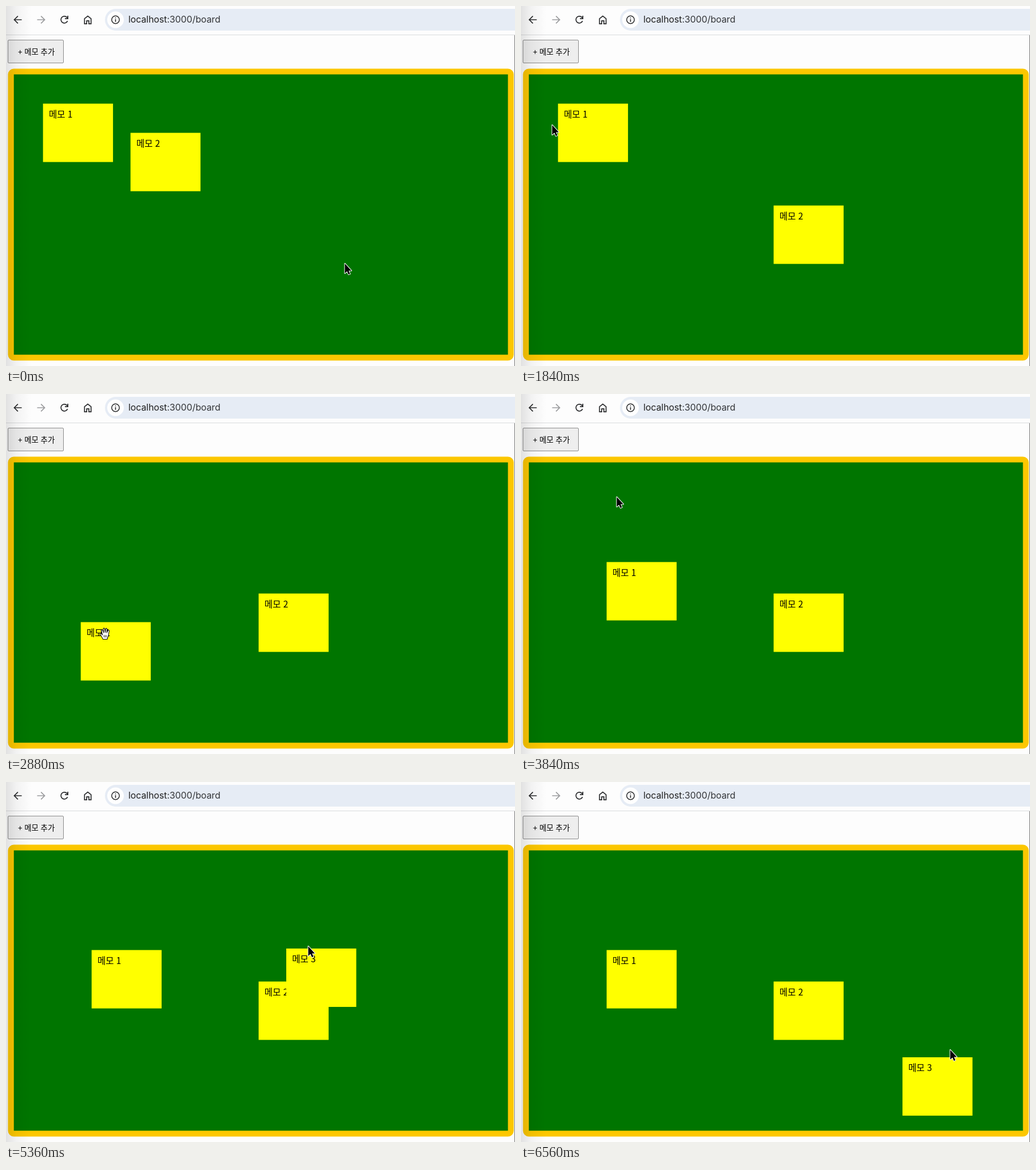
These frames come from a looping animation (890x629 px, 6.64 s). An HTML page:

```html
<!DOCTYPE html>
<html lang="ko">
<head>
<meta charset="utf-8">
<title>Memo board</title>
<style>
  html, body { margin: 0; width: 100%; height: 100%; overflow: hidden; background: #fdfdfd; }
  #stage { position: relative; width: 890px; height: 629px; overflow: hidden; color: #000;
    font-family: "Noto Sans CJK KR", "Noto Sans CJK", "Noto Sans CJK JP", sans-serif; }
  #stage > *, .memo { position: absolute; }
  #bar { left: 0; top: 0; }
  #url { left: 214px; top: 12px; font: 15.8px/24px Inter, Roboto, sans-serif; color: #333538; white-space: pre; }
  #url b { font-weight: 400; color: #1f1f1f; }
  #add { left: 3px; top: 58.5px; width: 97.5px; height: 41px; box-sizing: border-box; padding: 10px 0 0 17px;
    border: 1px solid #8c8c8c; border-radius: 2px; background: #eee; font-size: 13.4px; line-height: 18px;
    font-weight: 500; white-space: pre; }
  /* The page is zoomed by 2 percent */
  #board { left: 0; top: 0; width: 847px; height: 480px; border: 10px solid #fcc700; border-radius: 10px;
    background: #007500; transform-origin: 0 0; transform: translate(3.5px, 109.4px) scale(1.02); }
  .memo { left: 0; top: 0; width: 120px; height: 100px; box-sizing: border-box; padding: 8px 0 0 10px;
    background: #ff0; font-size: 15.2px; line-height: 18px; white-space: pre; }
  #lift { opacity: .9; box-shadow: 0 4px 16px rgba(0, 0, 0, .4); }
  #shade { left: 0; top: 0; width: 44px; height: 629px;
    background: linear-gradient(90deg, rgba(0,0,0,.11), rgba(0,0,0,.045) 40%, transparent); }
  #edge { left: 889px; top: 51px; width: 1px; height: 578px; background: #777; }
  #cursor { left: 0; top: 0; overflow: visible; }
</style>
</head>
<body>
<div id="stage">
  <svg id="bar" width="890" height="52" fill="none" stroke-width="1.7">
    <rect y="50" width="890" height="1" fill="#dadbdd"/>
    <rect x="173" y="5" width="760" height="38" rx="19" fill="#e6ecf5"/>
    <circle cx="191.5" cy="24" r="14.5" fill="#fff"/>
    <g stroke="#2b2c2e">
      <path d="M27.5 24H15M20.8 17.6 14.4 24l6.4 6.4"/>
      <path d="M54.5 24H67M61.2 17.6 67.6 24l-6.4 6.4" stroke="#9b9c9e"/>
      <path d="M107.6 26.2A6 6 0 1 1 106.4 19.6L108 21.4"/>
      <path d="M108.1 17v5.1H103"/>
      <path d="M137.3 22.1 143 17.6l5.7 4.5v9h-3.8v-5.3h-3.8v5.3h-3.8z"/>
      <circle cx="191.5" cy="24" r="6.7" stroke-width="1.5"/>
      <path d="M191.5 23v4.8M191.5 19.9v1.7" stroke-width="1.6"/>
    </g>
  </svg>
  <div id="url"><b>localhost</b>:3000/board</div>
  <div id="add">+ 메모 추가</div>
  <div id="board">
    <div class="memo">메모 1</div>
    <div class="memo">메모 2</div>
    <div class="memo">메모 3</div>
    <div class="memo" id="lift"></div>
  </div>
  <div id="shade"></div>
  <div id="edge"></div>
  <svg id="cursor" width="1" height="1" stroke-linejoin="round" stroke-linecap="round">
    <path id="arrow" d="M.5 1V18L4.4 14.4 7 20.2 9.6 19.1 7.1 13.4H12Z"
      fill="#000" stroke="#fff" stroke-width="2" paint-order="stroke"/>
    <g id="hand" stroke="#000" stroke-width="1.1" fill="#fff">
      <path d="M-3.6 10.5C-4 8-6.5 5.5-8 2.6-9 .6-6.8-.2-5.6 1.4L-4.4 3-6.3-4.2C-6.8-6.4-4.4-6.9-3.8-5L-2.4-.8-3-7.2C-3.1-9.4-.7-9.5-.4-7.4L.3-1.2 1.2-7.2C1.6-9.3 3.9-8.9 3.7-6.8L3.2-.9 4.9-4.4C5.9-6.3 8-5.4 7.3-3.4 6.6-1 6.7 1.8 6.1 4 5.5 6.3 4.2 8 4 10.5Z"/>
      <path d="M-1.7 3.6V7M.5 3.6V7M2.7 3.6V7" stroke-width=".8"/>
    </g>
  </svg>
</div>
<script>
const LOOP = 6640, STEP = 80, ZOOM = 1.02, LEFT = 13.7, TOP = 119.6;
const $ = id => document.getElementById(id);
const els = [...document.querySelectorAll('.memo:not(#lift)')];
const lift = $('lift'), cursor = $('cursor');

// Memo corners on the board, and when each appears
const memos = [
  { x: 50, y: 50, born: 0 },
  { x: 200, y: 100, born: 0 },
  { x: 467, y: 168, born: 4320 }
];

// Each gesture shifts the pointer, and the memo it holds, by (dx, dy)
const glide = (from, to, dx, dy, bend = 1) => ({ from, to, dx, dy, bend });
const drag = (memo, ...rest) => ({ memo, ...glide(...rest) });
const origin = { x: 592, y: 449 };
const gestures = [
  glide(160, 800, -300, -162),
  drag(1, 960, 1468, 224, 127, 1.36),
  glide(1520, 1840, -462, -207),
  glide(1840, 2080, 53, -17),
  drag(0, 2120, 2440, 66, 228),
  drag(0, 2920, 3400, 19, -105),
  glide(3520, 4287, -140, -233, 0.567),
  glide(4360, 5360, 476, 206),
  glide(5880, 6000, 28, 28),
  drag(2, 6040, 6340, 177, 190),
  glide(6380, 6560, 17, -37)
];

const smooth = u => u * u * (3 - 2 * u);

// Where a gesture has got to; bend curves the path
function shift(g, t) {
  const s = smooth(Math.min(1, (t - g.from) / (g.to - g.from)));
  return [g.dx * s ** (1 / g.bend), g.dy * s ** g.bend];
}

const place = (el, x, y) => { el.style.transform = `translate(${x}px, ${y}px)`; };
const show = (el, on) => { el.style.visibility = on ? 'visible' : 'hidden'; };

function draw(t) {
  const tip = { ...origin };
  const spots = memos.map(m => ({ ...m }));
  let held = -1;

  for (const g of gestures.filter(g => t >= g.from)) {
    const [dx, dy] = shift(g, t);
    tip.x += dx;
    tip.y += dy;
    if (!('memo' in g)) continue;
    const spot = spots[g.memo];
    const x = spot.x + dx / ZOOM, y = spot.y + dy / ZOOM;
    if (t < g.to) {
      held = g.memo;
      place(lift, x, y);
    } else {
      Object.assign(spot, { x, y });
    }
  }

  const bx = (tip.x - LEFT) / ZOOM, by = (tip.y - TOP) / ZOOM;
  let hover = false;
  spots.forEach((m, i) => {
    const born = t >= m.born;
    place(els[i], m.x, m.y);
    show(els[i], born);
    els[i].style.opacity = i === held ? 0.5 : 1;
    hover ||= born && bx >= m.x && bx < m.x + 120 && by >= m.y && by < m.y + 100;
  });

  const holding = held >= 0;
  show(lift, holding);
  if (holding) lift.textContent = els[held].textContent;
  show($('hand'), hover && !holding);
  show($('arrow'), !hover || holding);
  place(cursor, tip.x, tip.y);
}

const start = performance.now();
function tick() {
  const t = (performance.now() - start) % LOOP;
  draw(Math.floor(t / STEP) * STEP);
  requestAnimationFrame(tick);
}
tick();
</script>
</body>
</html>
```
